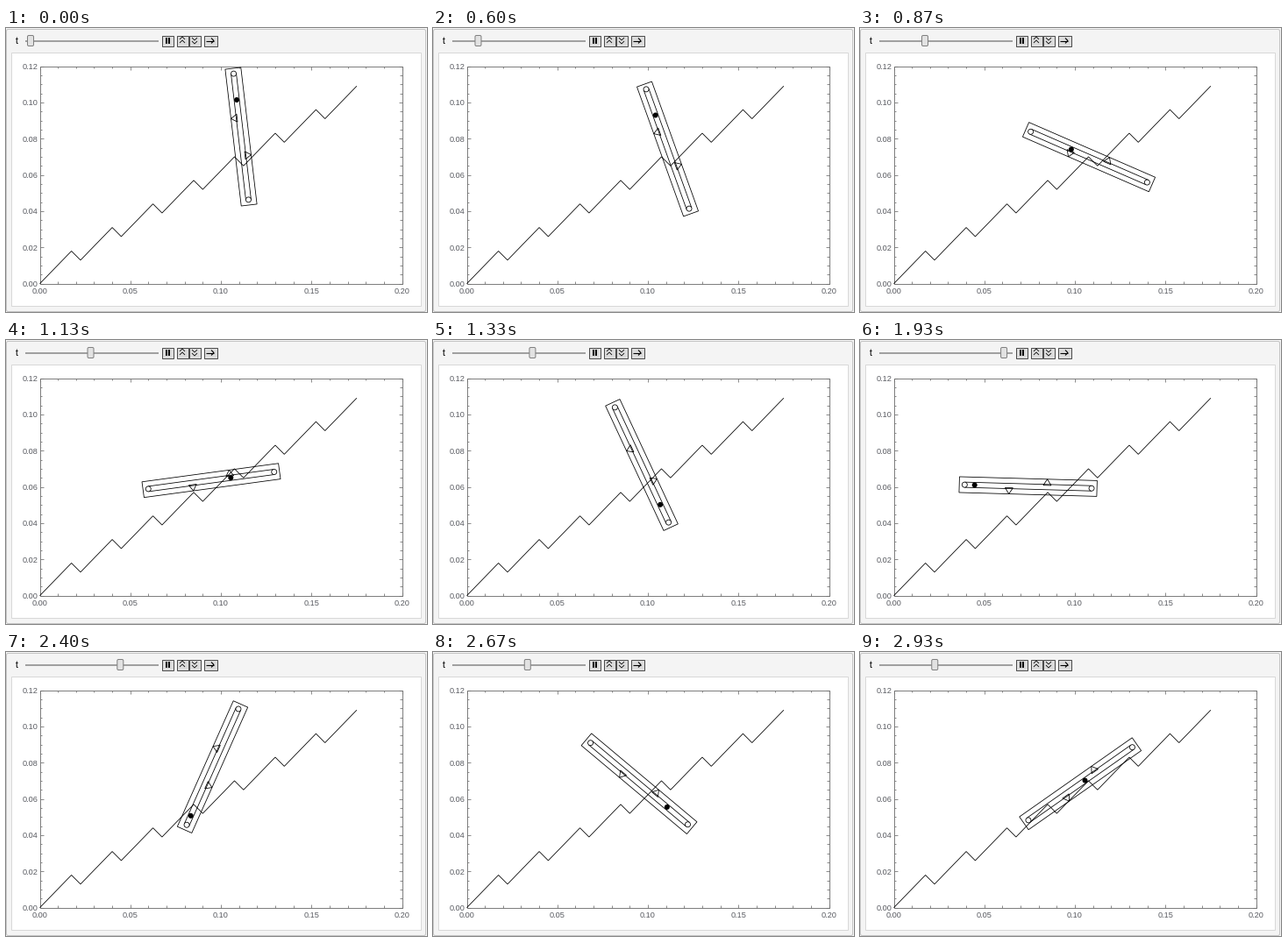
These frames come from a looping animation (480x324 px, 2.99 s). A matplotlib script:

```python
import numpy as np
import matplotlib.pyplot as plt
from matplotlib.animation import FuncAnimation
from matplotlib.collections import LineCollection
from matplotlib.patches import Circle, FancyBboxPatch, Polygon, Rectangle

W, H, DPI = 480, 324, 100
PX = 72 / DPI
TICK_MS, LOOP_MS = 10, 2990
LEFT, RIGHT, TOP, BOTTOM = 38.5, 451.5, 43.5, 291.7
FRAME, LABEL = "#707070", "#5a5c62"
INK = 0.8                       # line width in pixels

plt.rcParams["font.family"] = "Liberation Sans"
fig = plt.figure(figsize=(W / DPI, H / DPI), dpi=DPI, facecolor="#f4f4f4")
ax = fig.add_axes([0, 0, 1, 1])
ax.set(xlim=(0, W), ylim=(H, 0))
ax.axis("off")


def px(x):
    return LEFT + (RIGHT - LEFT) * x / 0.20


def py(y):
    return BOTTOM - (BOTTOM - TOP) * y / 0.12


def line(xs, ys, color="black", lw=INK, z=3):
    ax.plot(xs, ys, color=color, lw=lw * PX, zorder=z,
            solid_capstyle="butt", solid_joinstyle="miter")


def box(x, y, w, h, face, edge, lw=1.0, z=2, r=0):
    style = dict(fc=face, ec=edge, lw=lw * PX, zorder=z)
    if r:
        patch = FancyBboxPatch((x, y), w, h, boxstyle=f"round,pad=0,rounding_size={r}",
                               **style)
    else:
        patch = Rectangle((x, y), w, h, **style)
    return ax.add_patch(patch)


def text(x, y, s, ha, size=9.2, color=LABEL):
    ax.text(x, y, s, ha=ha, va="center_baseline", fontsize=size * PX, color=color)


def draw_panel():
    box(0.5, 1.5, 478, 322, "#f4f4f4", "#c4c4c4", z=0, r=2)
    line([479.5, 479.5], [0, H], lw=1, z=1)
    box(5.5, 27.5, 467, 289, "white", "#d8d8d8", z=1)
    text(12.5, 14.5, "t", "center", 10.5, "black")
    line([21.5, 173.5], [14.5, 14.5], "#8c8c8c", 1.6, z=2)
    for x, w in ((177.5, 13), (194.5, 13), (208.5, 13), (225.5, 15)):
        box(x, 8.5, w, 12, "#dcdcdc", "#4c4c4c")
    for x in (182, 185):
        box(x, 11, 1.6, 7, "black", "none")
    for dy in (-1.5, 2.5):
        y = 14.5 + dy
        line([198, 201, 204], [y, y - 3, y])
        line([212, 215, 218], [y - 2, y + 1, y - 2])
    line([228, 237], [14.5, 14.5], lw=1.1)
    line([234, 237, 234], [11.5, 14.5, 17.5], lw=1.1)


def draw_axes():
    box(LEFT, TOP, RIGHT - LEFT, BOTTOM - TOP, "none", FRAME, 0.9)
    ticks = []
    for i in range(21):
        x, n = px(i * 0.01), 4 if i % 5 == 0 else 2.4
        ticks += [[(x, BOTTOM), (x, BOTTOM - n)], [(x, TOP), (x, TOP + n)]]
        if i % 5 == 0:
            text(x, 299.7, f"{i * 0.01:.2f}", "center")
    for i in range(25):
        y, n = py(i * 0.005), 4 if i % 4 == 0 else 2.4
        ticks += [[(LEFT, y), (LEFT + n, y)], [(RIGHT, y), (RIGHT - n, y)]]
        if i % 4 == 0:
            text(36.7, y, f"{i * 0.005:.2f}", "right")
    ax.add_collection(LineCollection(ticks, colors=FRAME, linewidths=INK * PX, zorder=2))


def draw_stairs():
    i = np.arange(8)
    xs = np.stack([0.0225 * i, 0.0225 * i + 0.0175], 1).ravel()
    ys = np.stack([0.013 * i, 0.013 * i + 0.018], 1).ravel()
    line(px(xs), py(ys))


# Each phase gives centre x, centre y, tilt in degrees, ball offset along the tube.
START, HIT, FREE, END = 4.83, 15, 23, 29


def topple(s):
    """The rod tips over ever faster while it drops."""
    t = s - START
    q = (t / (HIT - START)) ** 4
    return (268 - 16.8 * q, 124 + 3.89 * t - 0.1285 * t**2,
            96.7 + 4.58 * np.expm1(0.3235 * t), 42.3 - 48.8 * q)


# The swing back is one cubic through four poses
POSES = np.array([(251.2, 150.2, 215.3, -6.5), (234, 160.2, 187.7, -22.5),
                  (238, 142.5, 115, -50), (235.5, 131.1, 66, -61)])
SWING = np.polyfit([0, 2, 5, 8], POSES, 3)


def swing(s):
    return np.polyval(SWING[:, :, None], s - HIT).ravel() if False else \
        (s - HIT) ** np.arange(3, -1, -1) @ SWING


def fly(s):
    """Free fall about the centre of mass, with the ball at the tube's end."""
    t = s - FREE
    tilt = 66 - 11.27 * t
    a = np.radians(tilt)
    return (223.1 - 10.32 * t + 30.5 * np.cos(a),
            159 - 3.1 * t + 0.72 * t**2 - 30.5 * np.sin(a), tilt, -61)


def pose(s):
    return topple(s) if s <= HIT else swing(s) if s <= FREE else fly(s)


draw_panel()
draw_axes()
draw_stairs()
thumb = box(24.5, 8.5, 7, 12, "#e2e2e2", "#808080", z=4, r=1.5)

HALF_L, HALF_W, TUBE, PIN = 78.5, 9, 72.4, 3
corners = np.array([(-1, -1), (1, -1), (1, 1), (-1, 1)]) * (HALF_L, HALF_W)
hook = np.array([(17.2, 2), (26.2, 2), (21.7, 9)])
rail = np.array([(-TUBE, PIN), (TUBE, PIN)])
shapes = [corners, hook, -hook, rail, -rail]
parts = [ax.add_patch(Polygon(s, closed=len(s) > 2, fill=False, ec="black",
                              lw=INK * PX, zorder=5)) for s in shapes]
pins = [ax.add_patch(Circle((0, 0), PIN, fc="white", ec="black", lw=INK * PX, zorder=6))
        for _ in range(2)]
ball = ax.add_patch(Circle((0, 0), 3, fc="black", ec="none", zorder=7))


def update(n):
    step = (TICK_MS * n + 4) * 3 // 200          # 15 steps a second
    s = max(START, min(step, 2 * END + 1 - step))  # there and back
    x, y, tilt, roll = pose(s)
    c, d = np.cos(np.radians(tilt)), np.sin(np.radians(tilt))
    turn = np.array([(c, -d), (-d, -c)])

    def place(pts):
        return np.asarray(pts) @ turn + (x, y)

    for part, shape in zip(parts, shapes):
        part.set_xy(place(shape))
    for pin, end in zip(pins, (-TUBE, TUBE)):
        pin.center = place((end, 0))
    ball.center = place((roll, 0))
    thumb.set_x(24.5 + 5.63 * (s - START))
    return [*parts, *pins, ball, thumb]


anim = FuncAnimation(fig, update, frames=LOOP_MS // TICK_MS, interval=TICK_MS,
                     init_func=lambda: update(0), repeat=True, repeat_delay=0)
plt.show()
```
